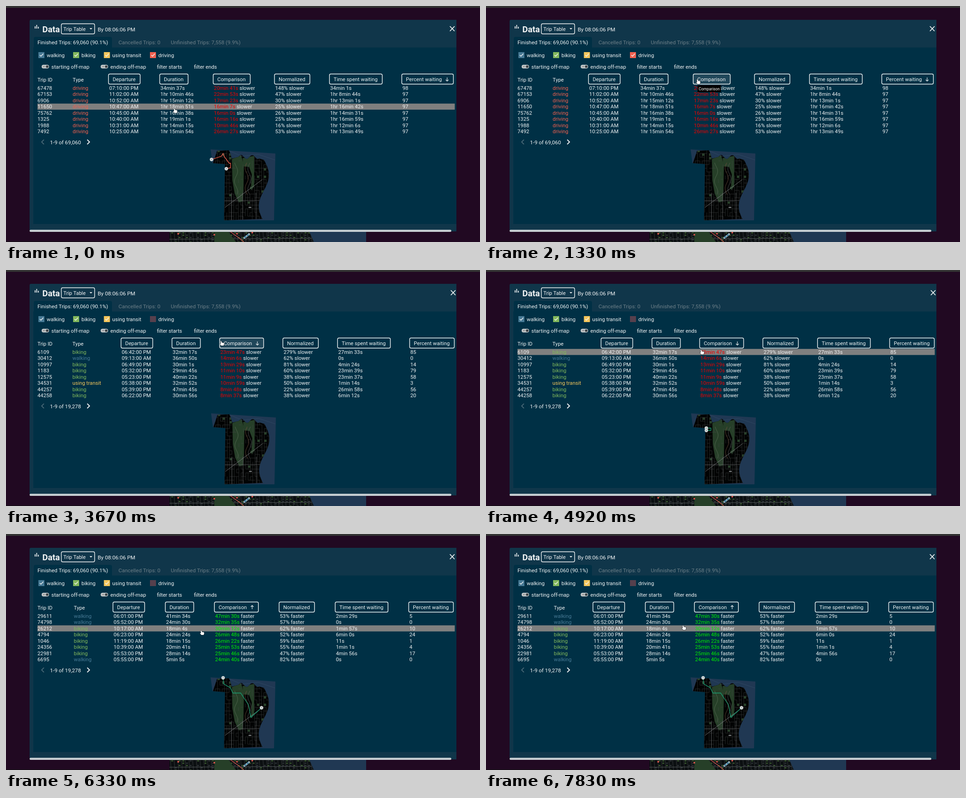
Write an HTML page with a canvas that moves like this. It is 1024x512 px and loops after 8 s.

```html
<!DOCTYPE html>
<html lang="en">
<head>
<meta charset="utf-8">
<title>Trip table</title>
<style>
html, body { margin: 0; width: 100%; height: 100%; overflow: hidden; background: #210922; }
canvas { display: block; }
</style>
</head>
<body>
<canvas id="stage" width="1024" height="512"></canvas>
<script>
const ctx = document.getElementById('stage').getContext('2d');
const LOOP = 8000, FPS = 12;
const PANEL = '#003045', EDGE = '#10364a', HOVER = '#20475a', WHITE = '#f1f3f4';
const WATER = '#203853', PARK = '#263f28', STREET = '#45484a';
const ROW = 13.5, FIRST_ROW = 178, LEFT = 68;
const TYPES = {
  w: ['walking', '#467994'], b: ['biking', '#82b85c'],
  t: ['using transit', '#f5c65b'], d: ['driving', '#f2604f']
};
const HEADERS = ['Departure', 'Duration', 'Comparison', 'Normalized', 'Time spent waiting', 'Percent waiting'];

// Each row: id|type|departure|duration|comparison|normalized|waiting|percent
const parse = text => text.trim().split('\n').map(line => line.trim().split('|'));
const views = [
  { from: 0, total: '69,060', sort: 5, dir: 1, word: 'slower', shift: 0, rows: parse(`
    67478|d|07:10:00 PM|34min 37s|20min 41s|148%|34min 1s|98
    67153|d|11:02:00 AM|1hr 10min 46s|22min 53s|47%|1hr 8min 44s|97
    6906|d|10:52:00 AM|1hr 15min 12s|17min 23s|30%|1hr 13min 1s|97
    11650|d|10:47:00 AM|1hr 18min 51s|16min 7s|25%|1hr 16min 42s|97
    75762|d|10:45:00 AM|1hr 16min 38s|16min 0s|26%|1hr 14min 31s|97
    1325|d|10:40:00 AM|1hr 19min 1s|16min 16s|25%|1hr 16min 59s|97
    1988|d|10:31:00 AM|1hr 14min 15s|10min 46s|16%|1hr 12min 6s|97
    7492|d|10:25:00 AM|1hr 15min 54s|26min 27s|53%|1hr 13min 49s|97`) },
  { from: 33, total: '19,278', sort: 5, dir: 1, word: 'slower', shift: 0, rows: parse(`
    6109|b|06:42:00 PM|32min 17s|23min 47s|279%|27min 33s|85
    18342|b|05:48:00 PM|31min 20s|6min 12s|25%|26min 19s|84
    20715|b|05:51:00 PM|28min 54s|5min 41s|24%|23min 42s|82
    9264|b|06:04:00 PM|30min 6s|7min 18s|32%|24min 23s|81
    31577|b|05:37:00 PM|33min 11s|4min 35s|16%|26min 33s|80
    1183|b|05:32:00 PM|29min 45s|11min 10s|60%|23min 39s|79
    28630|b|06:11:00 PM|27min 8s|3min 52s|17%|20min 53s|77
    12408|b|05:44:00 PM|25min 37s|2min 49s|12%|19min 28s|76`) },
  { from: 44, total: '19,278', sort: 2, dir: 1, word: 'slower', shift: 1, rows: parse(`
    6109|b|06:42:00 PM|32min 17s|23min 47s|279%|27min 33s|85
    30412|w|09:13:00 AM|36min 50s|14min 6s|62%|0s|0
    10997|b|06:49:00 PM|30min 1s|13min 29s|81%|4min 24s|14
    1183|b|05:32:00 PM|29min 45s|11min 10s|60%|23min 39s|79
    12575|b|05:23:00 PM|40min 22s|11min 9s|38%|23min 37s|58
    34531|t|05:38:00 PM|32min 52s|10min 59s|50%|1min 14s|3
    44257|b|05:39:00 PM|47min 45s|8min 48s|22%|26min 58s|56
    44258|b|06:22:00 PM|30min 56s|8min 37s|38%|6min 12s|20`) },
  { from: 64, total: '19,278', sort: 2, dir: -1, word: 'faster', shift: 0, rows: parse(`
    29611|w|06:01:00 PM|41min 34s|47min 30s|53%|2min 29s|5
    74798|w|05:52:00 PM|24min 30s|32min 35s|57%|0s|0
    26212|b|10:17:00 AM|18min 4s|30min 12s|62%|1min 57s|10
    4794|b|06:23:00 PM|24min 24s|26min 48s|52%|6min 0s|24
    1046|b|11:19:00 AM|18min 15s|26min 22s|59%|11s|1
    24356|b|10:39:00 AM|20min 41s|25min 53s|55%|1min 1s|4
    22981|b|05:53:00 PM|28min 14s|25min 46s|47%|4min 56s|17
    6695|w|05:55:00 PM|5min 5s|24min 40s|82%|0s|0`) }
];

// Pointer moves: first step, last step, destination
const moves = [[2, 6, 374, 238], [8, 11, 368, 228], [13, 15, 459, 164], [17, 27, 324, 119],
  [29, 30, 334, 117], [36, 42, 467, 159], [52, 54, 479, 178], [56, 57, 467, 178], [59, 62, 466, 161],
  [67, 76, 424, 214], [76, 80, 422, 234], [82, 86, 425, 203], [86, 89, 427, 180], [91, 94, 428, 203]];

function pointerAt(step) {
  return moves.reduce(([x, y], [from, to, toX, toY]) => {
    const k = Math.min(1, Math.max(0, (step - from) / (to - from)));
    return [x + (toX - x) * k, y + (toY - y) * k];
  }, [366, 227]);
}

function setFont(size = 11.25, weight = 400) {
  ctx.font = `${weight} ${size}px Roboto, sans-serif`;
}
function text(value, x, y, color = WHITE, size = 11.25, weight = 400) {
  setFont(size, weight);
  ctx.fillStyle = color;
  ctx.fillText(value, x, y + size * 0.355);
  return x + ctx.measureText(value).width;
}
function rect(x, y, w, h, color) {
  ctx.fillStyle = color;
  ctx.fillRect(x, y, w, h);
}
function box(x, y, w, h, radius, fill, stroke) {
  ctx.beginPath();
  ctx.roundRect(x, y, w, h, radius);
  if (fill) { ctx.fillStyle = fill; ctx.fill(); }
  if (stroke) { ctx.strokeStyle = stroke; ctx.lineWidth = 1.4; ctx.stroke(); }
}
function trace(points) {
  ctx.beginPath();
  for (let i = 0; i < points.length; i += 2) ctx.lineTo(points[i], points[i + 1]);
}
function line(points, color, width = 1) {
  trace(points);
  ctx.strokeStyle = color;
  ctx.lineWidth = width;
  ctx.stroke();
}
function poly(points, color) {
  trace(points);
  ctx.fillStyle = color;
  ctx.fill();
}
function dot(x, y, r, color) {
  ctx.beginPath();
  ctx.arc(x, y, r, 0, 7);
  ctx.fillStyle = color;
  ctx.fill();
}
function chevron(x, y, dx, dy, color, width) {
  line([x - dx - dy, y - dy - dx, x, y, x - dx + dy, y - dy + dx], color, width);
}
function randomizer(seed) {
  return () => (seed = (seed * 16807) % 2147483647) / 2147483647;
}

function backdrop() {
  rect(0, 0, 1024, 512, '#210922');
  rect(0, 0, 1024, 4, '#333');
  rect(0, 511, 350, 1, '#111');
  const rnd = randomizer(41);
  rect(353, 489, 425, 23, '#0b0f11');
  for (let x = 355; x < 660; x += 8) {
    line([x, 489, x + 2, 512], STREET, 0.7);
    for (let y = 491; y < 512; y += 5) {
      if (rnd() < 0.6) rect(x + 2, y, 4, 2.5, rnd() < 0.4 ? '#38562f' : '#2b3034');
    }
  }
  line([353, 490, 660, 490], '#666b6e', 0.8);
  line([353, 506, 660, 504], '#666b6e', 0.8);
  poly([450, 489, 480, 489, 497, 512, 450, 512], PARK);
  poly([655, 489, 778, 489, 778, 512, 665, 512], WATER);
  line([485, 490, 503, 503, 514, 512], '#d85850', 1.2);
  for (const x of [372, 450, 499, 532]) dot(x, 491 + rnd() * 10, 1.8, '#ef5b50');
  for (let i = 0; i < 5; i++) rect(513 + i * 2.5, 501 - i * 2, 4, 4, i % 2 ? '#3f83a5' : '#8ea6b3');
}

function coastline() {
  const points = [471, 465, 473, 343, 447, 341, 456, 314, 482, 313, 488, 331];
  for (let x = 502; x <= 548; x += 3) points.push(x, 327.5 - 4.5 * Math.cos((x - 508) * Math.PI / 12));
  for (let y = 334; y <= 465; y += 4) points.push(557 + 11 * Math.sin((y - 333) / 21.5), y);
  return points;
}

function areaMap() {
  poly([442, 311, 582, 320, 579, 465, 471, 465, 473, 343, 446, 341], WATER);
  const land = coastline();
  poly(land, '#020303');
  ctx.save();
  trace(land);
  ctx.clip();
  poly([488, 332, 508, 324, 514, 345, 513, 400, 511, 424, 503, 426, 494, 407, 489, 378], PARK);
  poly([511, 330, 536, 325, 536, 392, 529, 400, 531, 365, 525, 349, 513, 348], PARK);
  const rnd = randomizer(77);
  for (let x = 447; x < 570; x += 5) {
    for (let y = 312; y < 465; y += 8) {
      const inPark = x > 486 && x < 536 && y < 405;
      const north = x < 484 && y < 328;
      if (rnd() < (north ? 0.35 : 0.04)) rect(x, y, 5, 5, PARK);
      if (rnd() < (inPark ? 0.12 : 0.75)) line([x, y, x, y + 8], STREET, 0.5);
      if (rnd() < (inPark ? 0.08 : 0.6)) line([x, y, x + 5, y], STREET, 0.5);
    }
  }
  // Winding paths around the hills beside the park
  for (const [x, color] of [[497, '#5b7058'], [520, '#75543f'], [526, '#5a5d5f']]) {
    const path = [];
    for (let y = 340; y < 410; y += 3) path.push(x + 3.5 * Math.sin(y / 7 + x), y);
    line(path, color, 0.7);
  }
  line([473, 437, 553, 377], '#85878a', 0.8);
  for (const x of [487, 511, 540]) line([x, 405, x, 465], '#76787a', 0.6);
  line([472, 422, 552, 422], '#76787a', 0.6);
  rect(524, 436, 6, 1.5, '#a9adb0');
  ctx.restore();
  line([481, 314, 510, 326, 545, 322, 581, 334], '#36506a', 0.6);
}

const paths = {
  d: [444, 333, 465, 326, 469, 320, 471, 326, 482, 341, 485, 341, 485, 351, 476, 353],
  6109: [475, 343, 485, 343, 485, 348, 475, 348],
  26212: [469, 312, 470, 325, 485, 334, 490, 345, 507, 345, 524, 371, 529, 398, 552, 377]
};

// A seeded staircase along the streets stands in for trips without a known path.
function streetWalk(seed) {
  const rnd = randomizer(seed);
  const points = [476, 345];
  for (let i = 0; i < 6; i++) {
    const [x, y] = points.slice(-2), nextX = x + rnd() * 16;
    points.push(nextX, y, nextX, y + rnd() * 16);
  }
  return points;
}

function drawRoute([id, type]) {
  const points = paths[id] || paths[type] || streetWalk(+id);
  line(points, type === 'b' ? '#199a72' : TYPES[type][1], 1.3);
  for (const [x, y] of [points.slice(0, 2), points.slice(-2)]) {
    dot(x, y, 3.7, '#d7dcdc');
    dot(x, y, 1.1, '#858b8d');
  }
}

function checkbox(x, key, checked = true) {
  rect(x, 100, 13, 13, checked ? TYPES[key][1] : '#56404d');
  if (checked) line([x + 3, 106.5, x + 5.5, 109, x + 10.5, 103.5], WHITE, 1.4);
  text(TYPES[key][0], x + 18, 107, WHITE, 11.4);
}
function toggle(x, label) {
  box(x, 127.5, 16, 8, 4, '#c8cccd');
  text('on', x + 2.5, 131.5, '#555', 5);
  dot(x + 12, 131.5, 2.8, '#3c4246');
  text(label, x + 21, 132, WHITE, 11.4);
}

function panelHeader(shift) {
  box(51, 30, 922, 459, [3, 0, 0, 0], EDGE);
  box(51, 485.5, 911, 4.5, 2, '#c9d0d4');
  rect(59, 90, 914, 383, PANEL);
  box(60, 67, 169, 24, [4, 4, 0, 0], PANEL);
  [5, 8, 4].forEach((h, i) => rect(62 + i * 3.5, 49 - h, 1.7, h, WHITE));
  text('Data', 78.5, 50, WHITE, 18.4, 700);
  box(119.5, 38.5, 72, 22, 3, null, WHITE);
  text('Trip Table', 124, 50.5, WHITE, 11);
  poly([180.5, 48, 186.5, 48, 183.5, 51], WHITE);
  text('By 08:06:06 PM', 198, 51, WHITE, 11.7);
  const x = 964 + shift * 2;
  line([x - 5, 44, x + 5, 54.5], WHITE, 1.8);
  line([x + 5, 44, x - 5, 54.5], WHITE, 1.8);
  text('Finished Trips: 69,060 (90.1%)', LEFT, 78.5, WHITE, 11.45);
  text('Cancelled Trips: 0', 243, 78.5, '#6c7f88', 11.45);
  text('Unfinished Trips: 7,558 (9.9%)', 356, 78.5, '#6c7f88', 11.45);
}

function filters(step) {
  if (step >= 30 && step < 33) box(309, 97, 58, 18, 3, HOVER);
  checkbox(70, 'w');
  checkbox(145, 'b');
  checkbox(211.5, 't');
  checkbox(311, 'd', step < 33);
  toggle(77, 'starting off-map');
  toggle(204.5, 'ending off-map');
  text('filter starts', 326, 132);
  text('filter ends', 406, 132);
}

function cellsOf([id, type, departure, duration, comparison, normalized, waiting, percent], word) {
  return [id, TYPES[type][0], departure, duration, `${comparison} ${word}`, `${normalized} ${word}`, waiting, percent];
}

// Columns are as wide as their widest content, with equal gaps between them.
function layout(view) {
  setFont();
  const measure = value => ctx.measureText(value).width + 1.5;
  const buttons = HEADERS.map((label, i) => measure(label) + 17.5 + (view.sort === i ? 15 : 0));
  const widths = [measure('Trip ID'), measure('Type'), ...buttons];
  for (const row of view.rows) {
    cellsOf(row, view.word).forEach((value, i) => widths[i] = Math.max(widths[i], measure(value)));
  }
  const space = 966.5 + view.shift * 2 - LEFT - widths.reduce((sum, w) => sum + w);
  let next = LEFT;
  const columns = widths.map(w => {
    const x = next;
    next += w + space / (widths.length - 1);
    return x;
  });
  return { columns, buttons };
}

function table(view, px, py) {
  const { columns, buttons } = layout(view);
  text('Trip ID', LEFT, 160);
  text('Type', columns[1], 160);
  HEADERS.forEach((label, i) => {
    const x = columns[i + 2], w = buttons[i];
    const hovered = px > x && px < x + w && py > 143 && py < 170;
    box(x, 147.5, w, 22, 3, hovered ? HOVER : null, WHITE);
    text(label, x + 9, 159.5);
    if (view.sort === i) {
      const arrowX = x + w - 13.5;
      line([arrowX, 155, arrowX, 163], WHITE, 1.1);
      chevron(arrowX, 159 + 4 * view.dir, 0, 3 * view.dir, WHITE, 1.1);
    }
  });
  const active = Math.floor((py - FIRST_ROW + ROW / 2) / ROW);
  view.rows.forEach((row, i) => {
    const y = FIRST_ROW + i * ROW;
    if (i === active) rect(LEFT, y - 6.8, 901.5, 13.2, '#7f7f7f');
    cellsOf(row, view.word).forEach((value, col) => {
      const x = columns[col] + (col > 1 ? 1.5 : 0);
      text(value, x, y, col === 1 ? TYPES[row[1]][1] : WHITE);
    });
    // The time difference is coloured; only its last word stays white.
    const x = columns[4] + 1.5;
    const width = ctx.measureText(row[4]).width;
    rect(x - 1, y - 6, width + 2, 12, i === active ? '#7f7f7f' : PANEL);
    text(row[4], x, y, view.dir > 0 ? '#f00000' : '#00f000');
  });
  chevron(77, 295, -5, 0, '#577481', 1.5);
  const end = text('1-9 of ' + view.total, 95, 296, WHITE, 11.5);
  chevron(end + 18.5, 295, 5, 0, WHITE, 1.9);
  return view.rows[active];
}

function tooltip(label, x, y) {
  setFont(8.4);
  rect(x - 2, y + 8, ctx.measureText(label).width + 5, 15, '#000');
  text(label, x + 0.5, y + 16, '#fff', 8.4);
}

function hand(x, y) {
  ctx.save();
  ctx.translate(x, y);
  trace([-3.5, -4.5, -1.5, -4.5, -1, -1.5, 3.5, -0.8, 4.2, 1, 3, 5, -2, 5, -5, 1, -2.8, 1]);
  ctx.closePath();
  ctx.lineJoin = 'round';
  ctx.lineWidth = 1.2;
  ctx.strokeStyle = '#20282d';
  ctx.stroke();
  ctx.fillStyle = '#fff';
  ctx.fill();
  ctx.restore();
}

function draw(now) {
  const step = Math.floor(((now % LOOP) + 5) * FPS / 1000) % 96;
  const view = views.findLast(v => step >= v.from);
  const [x, y] = pointerAt(step);
  backdrop();
  panelHeader(view.shift);
  filters(step);
  const active = table(view, x - 2, y - 4);
  ctx.save();
  ctx.translate(view.shift, 0);
  areaMap();
  if (active) drawRoute(active);
  ctx.restore();
  if (step === 31 || step === 32) tooltip('driving', x, y);
  if (step === 16 || step === 17 || step === 42 || step === 43) tooltip('Comparison', x, y);
  hand(x, y);
}

const start = performance.now();
(function tick() {
  draw(performance.now() - start);
  requestAnimationFrame(tick);
})();
</script>
</body>
</html>
```
